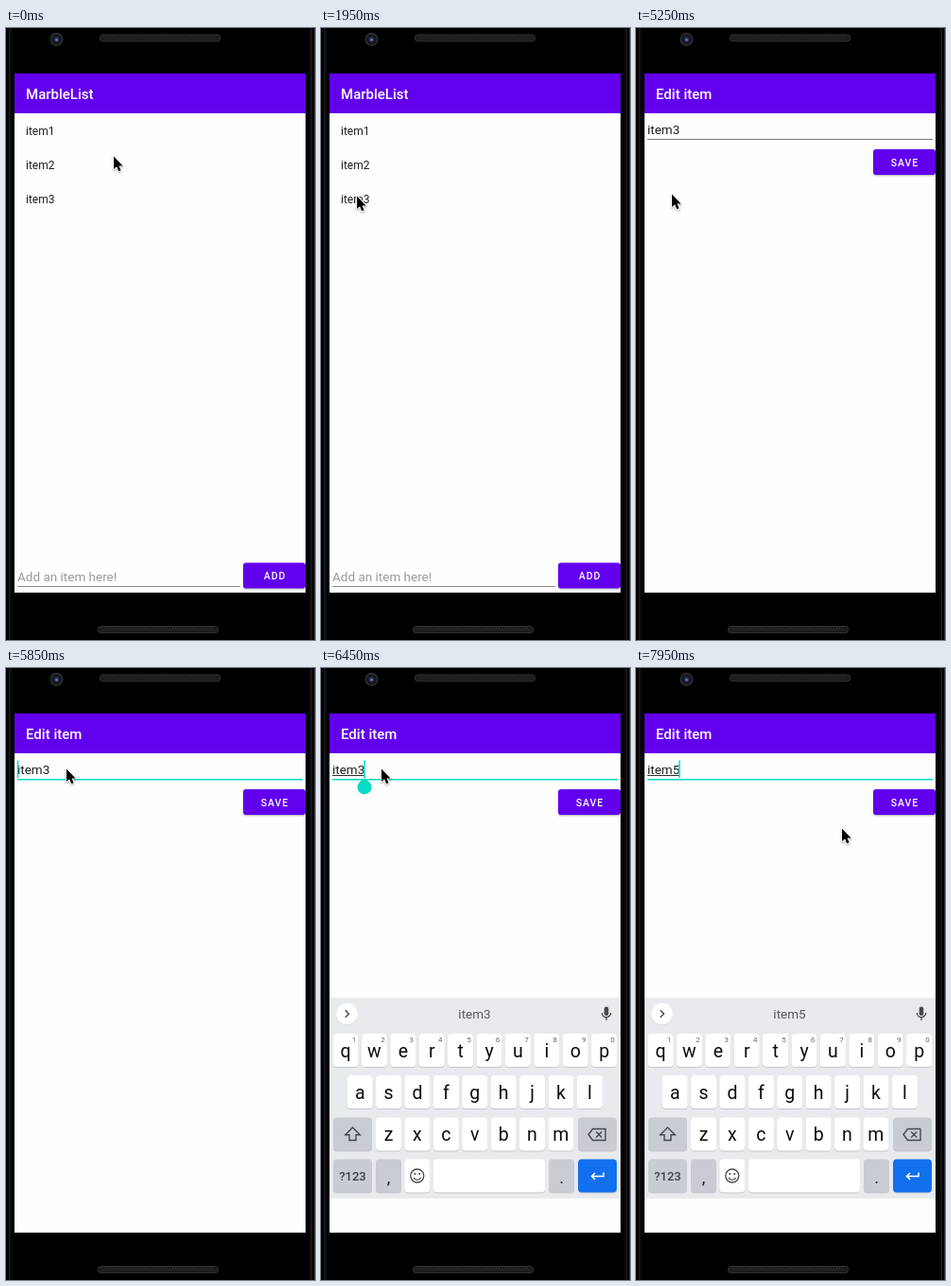
Recreate the animation shown at these times as an HTML page with a canvas. Size 327 by 646 pixels, loop 8000 ms.

```html
<!DOCTYPE html>
<html lang="en">
<head>
<meta charset="utf-8">
<title>Todo list demo</title>
<style>
html, body { margin: 0; width: 100%; height: 100%; overflow: hidden; background: #000; }
canvas { display: block; width: 327px; height: 646px; }
</style>
</head>
<body>
<canvas id="stage"></canvas>
<script>
const W = 327, H = 646, LOOP = 8000;
const PURPLE = '#6200ee', TEAL = '#03dac5', INK = '#202020';
const SCREEN = { x: 9, y: 48, w: 308, h: 548 };
const canvas = document.getElementById('stage');
const dpr = window.devicePixelRatio || 1;
canvas.width = Math.round(W * dpr);
canvas.height = Math.round(H * dpr);
const g = canvas.getContext('2d');

// Pointer positions: start time, x, y
const pointerSteps = [
  [0, 112, 135], [150, 119, 171], [300, 108, 173], [450, 35, 180], [600, 31, 180],
  [1650, 55, 177], [1950, 36, 177], [5250, 36, 175], [5400, 51, 137], [5550, 59, 112],
  [5700, 62, 106], [7800, 111, 125], [7950, 216, 169]
];
// Caret positions: start time, x (0 = hidden)
const caretSteps = [[0, 0], [5850, 12.5], [6000, 46], [6600, 0], [6900, 38.3], [7500, 46]];
const handleSteps = [[0, 0], [6000, 0.5], [6150, 1], [7050, 0]];
const wordSteps = [[0, 'item3'], [6900, 'item'], [7500, 'item5']];
const underlineSteps = [[0, 0], [6150, 34], [6900, 26.5], [7800, 34]];
const hintSteps = [[0, ['', 'item3', '']], [6900, ["item's", 'item', 'items']], [7800, ['', 'item5', '']]];

function at(steps, t) {
  let found = steps[0];
  for (const s of steps) if (s[0] <= t) found = s;
  return found;
}

function rect(x, y, w, h, color) {
  g.fillStyle = color;
  g.fillRect(x, y, w, h);
}

function round(x, y, w, h, r, color) {
  g.fillStyle = color;
  g.beginPath();
  g.roundRect(x, y, w, h, r);
  g.fill();
}

function disc(x, y, r, color) {
  g.fillStyle = color;
  g.beginPath();
  g.arc(x, y, r, 0, Math.PI * 2);
  g.fill();
}

function stroke(path, color, width) {
  g.strokeStyle = color;
  g.lineWidth = width;
  g.stroke(new Path2D(path));
}

function text(str, x, y, size, color, weight = 400, align = 'left', spacing = 0) {
  g.font = `${weight} ${size}px Roboto, sans-serif`;
  g.letterSpacing = spacing + 'px';
  g.textAlign = align;
  g.fillStyle = color;
  g.fillText(str, x, y);
  g.letterSpacing = '0px';
}

function clipped(x, y, w, h, draw) {
  g.save();
  g.beginPath();
  g.rect(x, y, w, h);
  g.clip();
  draw();
  g.restore();
}

function zoomed(scale, draw) {
  g.save();
  g.translate(163, 322);
  g.scale(scale, scale);
  g.translate(-163, -322);
  draw();
  g.restore();
}

function grille(x, y) {
  round(x, y, 128, 8, 4, '#303030');
  round(x + 1, y + 1, 126, 6, 3, '#1b1b1b');
  for (let i = 4; i < 124; i += 3) {
    rect(x + i, y + 2, 1, 1, '#3a3a3a');
    rect(x + i + 1.5, y + 4, 1, 1, '#3a3a3a');
  }
}

function phone() {
  rect(0, 0, W, H, '#000');
  rect(3, 0, 1, H, '#1d1d1d');
  rect(4, 0, 2, H, '#0c0c0c');
  rect(321, 0, 2, H, '#0c0c0c');
  rect(323, 0, 1, H, '#1d1d1d');
  rect(326, 0, 1, H, '#2a2a2a');
  disc(53.5, 12, 7, '#303034');
  disc(53.5, 12, 5.5, '#15151c');
  disc(53.5, 12, 3, '#25294f');
  disc(53.5, 12.5, 1.3, '#6f7fd0');
  grille(99, 6.5);
  grille(97, 631);
}

function page(title) {
  rect(SCREEN.x, SCREEN.y, SCREEN.w, SCREEN.h, '#fefefe');
  rect(SCREEN.x, SCREEN.y, SCREEN.w, 42, PURPLE);
  text(title, 21, 75, 15, '#fff', 500);
}

function button(label, y) {
  g.save();
  g.shadowColor = 'rgba(0,0,0,.3)';
  g.shadowBlur = 2 * dpr;
  g.shadowOffsetY = dpr;
  round(251, y, 66, 27, 3, PURPLE);
  g.restore();
  text(label, 284.5, y + 17.5, 10.5, '#fff', 500, 'center', 0.94);
}

function listPage() {
  page('MarbleList');
  for (let i = 0; i < 3; i++) text('item' + (i + 1), 21, 112.5 + 36 * i, 12, INK);
  text('Add an item here!', 12, 584, 13.5, '#9b9b9b');
  rect(12, 589, 236, 1, '#8a8a8a');
  button('ADD', 564.5);
}

function editPage(t) {
  const focused = t >= 5850;
  const caret = at(caretSteps, t)[1];
  const handle = at(handleSteps, t)[1];
  page('Edit item');
  text(at(wordSteps, t)[1], 12, 111.5, 13.5, INK);
  rect(12, 113, at(underlineSteps, t)[1], 1, '#303030');
  rect(12, 117, 302, focused ? 1.5 : 1, focused ? TEAL : '#7d7d7d');
  button('SAVE', 128);
  if (caret) rect(caret - 0.75, 97.5, 1.5, 18.5, TEAL);
  if (handle) {
    g.globalAlpha = handle;
    g.fillStyle = TEAL;
    g.fill(new Path2D('M46 116 L51.3 120.5 A7.5 7.5 0 1 1 40.7 120.5 Z'));
    g.globalAlpha = 1;
  }
}

function key(x, y, w, color = '#fff') {
  round(x, y + 1, w, 35, 4, '#c6c8cc');
  round(x, y, w, 35, 4, color);
}

function letters(row, x, y) {
  [...row].forEach((c, i) => {
    const cx = x + 30.4 * i;
    key(cx - 13.5, y, 27);
    text(c, cx, y + 24.5, 19.5, '#0c0c0c', 400, 'center');
  });
}

function suggestions(t) {
  const words = at(hintSteps, t)[1];
  words.forEach((w, i) => text(w, 162.5 + (i - 1) * 84, 370, 13.5, '#55585c', 400, 'center'));
  if (words[0]) for (const x of [120.5, 204.5]) rect(x, 358, 1, 14, '#cfd1d5');
}

function keyboard(t) {
  const GREY = '#c9ccd2', MARK = '#45484c';
  rect(9, 348, 308, 212, '#e8eaed');
  rect(9, 560, 308, 36, '#fefefe');
  disc(27.5, 365.5, 11.5, '#d9dbdf');
  disc(27.5, 365, 11.3, '#fff');
  stroke('M25.7 361.2 L29.5 365 L25.7 368.8', MARK, 1.4);
  suggestions(t);

  round(299.7, 357.5, 4.6, 9.5, 2.3, MARK);
  stroke('M297.3 364 A4.7 4.7 0 0 0 306.7 364 M302 368.7 V372', MARK, 1.3);

  letters('qwertyuiop', 26, 386);
  for (let i = 0; i < 10; i++) text((i + 1) % 10, 35 + 30.4 * i, 395, 8, '#666', 400, 'center');
  letters('asdfghjkl', 41.2, 430);
  letters('zxcvbnm', 71.5, 474.5);
  key(13, 474.5, 41, GREY);
  stroke('M33.5 485 L41.3 492.8 H37 V498.5 H30 V492.8 H25.7 Z', MARK, 1.4);
  key(272, 474.5, 41, GREY);
  stroke('M283 492.5 L287.5 486.5 H301 V498.5 H287.5 Z M291.2 489.5 L297.2 495.5 M297.2 489.5 L291.2 495.5', MARK, 1.4);

  key(13, 518.5, 41, GREY);
  text('?123', 33.5, 541, 13, '#3c4043', 500, 'center');
  key(58, 518.5, 27, GREY);
  text(',', 71.5, 544, 18, '#222', 400, 'center');
  key(88.3, 518.5, 27);
  stroke('M108.8 536 A7 7 0 1 1 94.8 536 A7 7 0 1 1 108.8 536 M98 538 A4.2 4.2 0 0 0 105.6 538', MARK, 1.3);
  disc(99.4, 534, 1.1, MARK);
  disc(104.2, 534, 1.1, MARK);
  key(119, 518.5, 118);
  key(241, 518.5, 27, GREY);
  text('.', 254.5, 544, 18, '#222', 400, 'center');
  key(272, 518.5, 41, '#1270ee');
  stroke('M299 532.5 V536.5 H286.5 M290 533 L286.5 536.5 L290 540', '#fff', 1.5);
}

function slidingKeyboard(t) {
  const rising = t < 6450;
  g.save();
  g.globalAlpha = rising ? 0.7 : 1;
  g.translate(0, rising ? 79 : 0);
  keyboard(t);
  g.restore();
}

function screen(t) {
  if (t < 4350) return listPage();
  if (t < 4650) {
    const early = t < 4500;
    const bottom = early ? 575 : 592;
    zoomed(early ? 1.043 : 1.06, listPage);
    clipped(9, 48, 308, bottom - 48, () => zoomed(early ? 0.985 : 0.996, () => editPage(t)));
    return;
  }
  editPage(t);
  if (t >= 6300) slidingKeyboard(t);
}

function pointer(t) {
  const [, x, y] = at(pointerSteps, t);
  const arrow = new Path2D('M0 0 V13.6 L3.1 10.8 L5.2 15.8 L7.6 14.8 L5.5 9.9 H9.6 Z');
  g.save();
  g.translate(x + 2, y + 0.5);
  g.lineJoin = 'round';
  g.shadowColor = 'rgba(0,0,0,.35)';
  g.shadowBlur = 2 * dpr;
  g.shadowOffsetY = dpr;
  g.strokeStyle = '#fff';
  g.lineWidth = 1.8;
  g.stroke(arrow);
  g.shadowColor = 'transparent';
  g.fillStyle = '#000';
  g.fill(arrow);
  g.restore();
}

function frame(now) {
  const t = now % LOOP;
  g.setTransform(dpr, 0, 0, dpr, 0, 0);
  phone();
  clipped(SCREEN.x, SCREEN.y, SCREEN.w, SCREEN.h, () => screen(t));
  pointer(t);
  requestAnimationFrame(frame);
}

let start;
requestAnimationFrame(function begin(now) {
  start = now;
  const tick = time => frame(time);
  tick(0);
});
</script>
</body>
</html>
```
